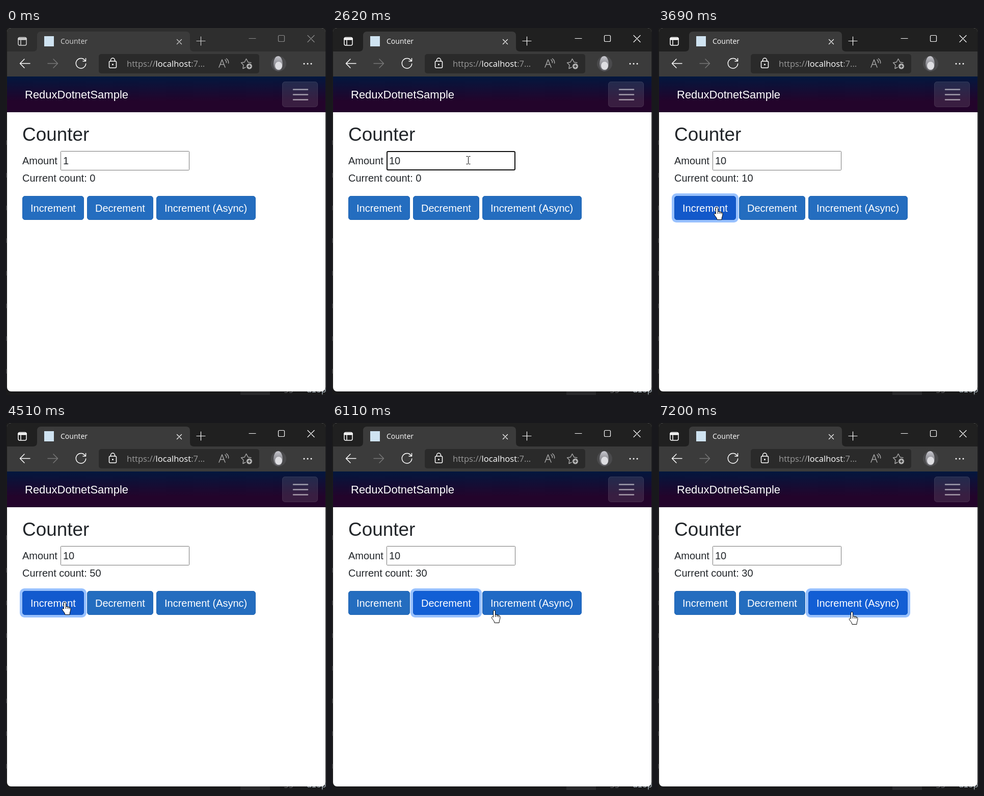
Animation of 628x719 px, one loop 8 s. Source, as an HTML page:

```html
<!DOCTYPE html>
<html lang="en">
<head>
<meta charset="utf-8">
<title>Counter</title>
<style>
html, body { margin: 0; width: 628px; height: 719px; overflow: hidden; background: #1a1a1b; }
svg { display: block; }
.page { font: 20px "Liberation Sans", Arial, sans-serif; fill: #212529; }
.ui { font-family: "Open Sans", "Noto Sans", sans-serif; }
.line { fill: none; stroke: #fff; stroke-width: 1.5; stroke-linecap: round; stroke-linejoin: round; }
.thin { stroke-width: 1.2; }
.soft { stroke: #a5a5a5; }
</style>
</head>
<body>
<svg width="628" height="719" viewBox="0 0 628 719">
  <defs>
    <linearGradient id="nav" x2="0" y2="1">
      <stop stop-color="#03173e"/><stop offset=".7" stop-color="#23042b"/>
    </linearGradient>
    <linearGradient id="fur" x2="0" y2="1">
      <stop stop-color="#c9c9d0"/><stop offset="1" stop-color="#55555a"/>
    </linearGradient>
    <clipPath id="face"><circle cx="535" cy="70" r="15"/></clipPath>
  </defs>

  <!-- desktop behind the window -->
  <rect width="628" height="719" fill="#1a1a1b"/>
  <path d="M460 712h58v7h-58z" fill="#29292b"/>
  <g font-family="'Noto Sans Mono', monospace" font-size="16">
    <text x="545" y="715" fill="#5d5d60">55</text>
    <text x="590" y="714" fill="#a9b4bc">disp</text>
  </g>
  <path d="M.5 220V690" stroke="#555" stroke-dasharray="9 55"/>

  <!-- window -->
  <rect x="2" width="625" height="712" rx="8" fill="#fff"/>
  <path id="strip" d="M2 8q0-8 8-8H619q8 0 8 8V46H2z"/>
  <path d="M2 46H53q8 0 8-8V15q0-8 8-8H353q8 0 8 8V38q0 8 8 8H627V95H2z" fill="#3b3b3b"/>
  <g id="title">
    <g class="line">
      <rect x="24" y="18.5" width="16" height="15.5" rx="3"/>
      <path d="M25 21.5h14" stroke-width="4"/><path d="M29 24v9"/>
      <path class="thin" d="M335.5 22.5l9 9m0-9l-9 9M374 25.5h17M382.5 17v17"/>
    </g>
    <text class="ui" x="107" y="31" font-size="14" fill="#fff">Counter</text>
  </g>
  <g id="controls" class="line thin">
    <path d="M477 20.5h13M592 14.5l13 13m0-13l-13 13"/>
    <rect x="534.5" y="14.5" width="12" height="12" rx="2"/>
  </g>
  <rect x="75" y="16" width="19" height="20" fill="#cfe3f1"/>

  <g class="line">
    <path d="M47 69.5H28M36 61l-8.500 8.500L36 78"/>
    <path d="M82 69.500h19M93 61l8.500 8.500L93 78" style="stroke:#777"/>
    <path d="M155.500 64.500A9.700 9.700 0 1 0 156.700 70M156.500 59.500v5.500h-5.500"/>
  </g>
  <rect x="182" y="51" width="315" height="38" rx="5" fill="#2a2a2a"/>
  <g class="line">
    <rect x="202.500" y="65" width="14" height="13" rx="2"/>
    <path d="M205.500 65v-2a4 4 0 0 1 8 0v2"/><circle cx="209.500" cy="71.500" r=".8"/>
  </g>
  <text class="ui" x="237" y="76" font-size="16.6" fill="#9a9a9a">https://<tspan fill="#fff">localhost</tspan>:7...</text>
  <g class="line soft">
    <path d="M418 77l6-15 6 15M420.5 71.5h7M430 62q3 3 2.500 6M432.5 60q5 4 4 9"/>
    <path d="M470 77l-5 2.500 1-7-4.500-4.500 6.500-1 3.500-6.500 3.500 6.500 6 1"/>
  </g>
  <circle cx="477.5" cy="75" r="5.5" fill="#b5b5b5"/>
  <path d="M474.5 75h6m-3-3v6" stroke="#2a2a2a" stroke-width="1.4"/>
  <g clip-path="url(#face)">
    <path d="M520 55h30v30h-30z" fill="#4a4a4c"/>
    <ellipse cx="534" cy="70" rx="9" ry="15" fill="url(#fur)"/>
    <ellipse cx="535" cy="74" rx="7" ry="8" fill="#dedee2"/>
  </g>
  <path d="M585 70h15" class="line" style="stroke-width:3;stroke-dasharray:0 7"/>

  <!-- page -->
  <rect x="2" y="95" width="625" height="70" fill="url(#nav)"/>
  <rect x="542.5" y="105.5" width="69" height="49" rx="5" fill="#fff" fill-opacity=".1" stroke="#fff" stroke-opacity=".12"/>
  <path d="M564 120.5h28m-28 10h28m-28 10h28" stroke="#fff" stroke-opacity=".55" stroke-width="2.5" stroke-linecap="round"/>
  <g class="page">
    <text x="37" y="138" font-size="22" fill="#fff">ReduxDotnetSample</text>
    <text x="32" y="221" font-size="36.9">Counter</text>
    <text x="32" y="267">Amount</text>
    <rect id="field" fill="#fff"/>
    <text id="amount" x="112" y="267"></text>
    <rect id="caret" y="249" width="1" height="22" fill="#000"/>
    <text id="count" x="32" y="301"></text>
    <g id="buttons"></g>
  </g>

  <g id="pointer" stroke="#000" fill="#fff" stroke-linejoin="round">
    <path id="arrow" d="M0 0V17l4-3.800 2.700 6.300 2.700-1.200-2.700-6.100h5.600z"/>
    <path id="beam" d="M-4-7.500h3l1 1 1-1h3M0-6.500v13M-4 7.500h3l1-1 1 1h3" fill="none"/>
    <g id="hand">
      <path d="M-2 2a2 2 0 0 1 4 0V8l7 2q2.500 .8 2.500 3.500c0 4-2 6-2 11h-9c-.5-4-3-5.500-5.500-9.500-.8-2 1.200-3.500 3-1.700z"/>
      <path d="M2 8v5M5.500 9v4M8.500 10v3.500" fill="none"/>
    </g>
  </g>
</svg>
<script>
const LOOP = 8000, ENTER = 250, FOCUS = 1300, TYPE = 2080, FADE = 150, RELEASE = 140, BLINK = 520;
const $ = id => document.getElementById(id);
const set = (el, attrs) => { for (const k in attrs) el.setAttribute(k, attrs[k]); };
const clamp = v => Math.min(1, Math.max(0, v));
const mix = (a, b, k) => a.map((v, i) => v + (b[i] - v) * k);

// Pointer stops; each move bends towards "via"
const entry = [447, 607];
const moves = [
  { from: ENTER, to: 830, via: [268, 331], end: [268, 258] },
  { from: 2620, to: 3160, via: [208, 380], end: [115, 351] },
  { from: 4540, to: 4920, via: [160, 366], end: [202, 362] },
  { from: 5980, to: 6640, via: [350, 368], end: [380, 370] }
];

// Each button takes n clicks, one per gap, the first at time "click"
const buttons = [
  { text: "Increment", x: 32, w: 121, click: 3360, gap: 220, n: 5, add: 10 },
  { text: "Decrement", x: 159, w: 130, click: 4990, gap: 280, n: 2, add: -10 },
  { text: "Increment (Async)", x: 295, w: 195, click: 6840, gap: 220, n: 1, add: 0 }
];
buttons.forEach((b, i) => b.blur = buttons[i + 1]?.click ?? LOOP);
const shades = [[36, 109, 191], [18, 95, 213], [18, 88, 202]];

function pointerAt(t) {
  let pos = entry;
  for (const m of moves) {
    const k = 1 - (1 - clamp((t - m.from) / (m.to - m.from))) ** 3;
    pos = mix(mix(pos, m.via, k), mix(m.via, m.end, k), k);
  }
  return pos;
}

const inside = ([x, y], left, top, w, h) => x > left && x < left + w && y > top && y < top + h;
const over = (b, pos) => inside(pos, b.x, 329, b.w, 47);
const focused = (b, t) => t >= b.click && t < b.blur;
const pressed = (b, t) => t >= b.click && t < b.click + b.n * b.gap;
// 0 rest, 1 hover or focus, 2 pressed
const shade = (b, t) => pressed(b, t) ? 2 : +(focused(b, t) || over(b, pointerAt(t)));

// A linear transition is the mean of the state over the last FADE ms
function faded(state, t) {
  const n = 12;
  let sum = 0;
  for (let i = 0; i < n; i++) sum += state(t - FADE * (i + .5) / n);
  return sum / n;
}

function add(tag, attrs, text = "") {
  const el = document.createElementNS("http://www.w3.org/2000/svg", tag);
  set(el, attrs);
  el.textContent = text;
  return $("buttons").appendChild(el);
}
for (const b of buttons) {
  b.glow = add("rect", { x: b.x - 5, y: 324, width: b.w + 10, height: 57, rx: 9, fill: "#98c1fe" });
  b.box = add("rect", { x: b.x + .5, y: 329.5, width: b.w - 1, height: 46, rx: 4.5 });
  add("text", { x: b.x + 16, y: 360, fill: "#fff" }, b.text);
}

function drawButton(b, t) {
  const level = faded(s => shade(b, s), t), low = Math.min(1, Math.floor(level));
  const rgb = mix(shades[low], shades[low + 1], level - low);
  set(b.glow, { opacity: faded(s => focused(b, s), t) });
  set(b.box, { fill: `rgb(${rgb})`, stroke: `rgb(${rgb.map(v => v * .93)})` });
}

function drawField(t, hover) {
  const focus = t >= FOCUS && t < buttons[0].click, typed = t >= TYPE;
  set($("field"), focus
    ? { x: 108, y: 242, width: 251, height: 36, rx: 2, stroke: "#101010", "stroke-width": 2 }
    : { x: 107.5, y: 241.5, width: 252, height: 37, rx: 1, stroke: hover ? "#4f4f4f" : "#767676", "stroke-width": 1 });
  $("amount").textContent = typed ? "10" : "1";
  const blink = Math.floor((t - (typed ? TYPE : FOCUS + 70)) / BLINK) % 2;
  set($("caret"), { x: typed ? 134 : 123, opacity: focus && blink === 0 ? 1 : 0 });
}

function drawPointer(t, pos, inField) {
  const kind = inField ? "beam" : buttons.some(b => over(b, pos)) ? "hand" : "arrow";
  for (const id of ["arrow", "beam", "hand"]) set($(id), { visibility: id === kind && t >= ENTER ? "visible" : "hidden" });
  const [x, y] = pos.map(Math.round);
  set($("pointer"), { transform: `translate(${x + .5} ${y})` });
}

function draw(t) {
  const active = clamp((t - FOCUS) / 120), gray = 46 - 14 * active;
  set($("strip"), { fill: `rgb(${gray},${gray},${gray})` });
  set($("title"), { opacity: .78 + .22 * active });
  set($("controls"), { opacity: .45 + .55 * active });

  const pos = pointerAt(t), inField = inside(pos, 107, 241, 253, 38);
  drawPointer(t, pos, inField);
  drawField(t, inField);

  let count = 0;
  for (const b of buttons) {
    const done = Math.floor((t - b.click - RELEASE) / b.gap) + 1;
    count += b.add * Math.max(0, Math.min(b.n, done));
    drawButton(b, t);
  }
  $("count").textContent = "Current count: " + count;
}

const start = performance.now();
function tick() {
  draw((performance.now() - start) % LOOP);
  requestAnimationFrame(tick);
}
tick();
</script>
</body>
</html>
```
